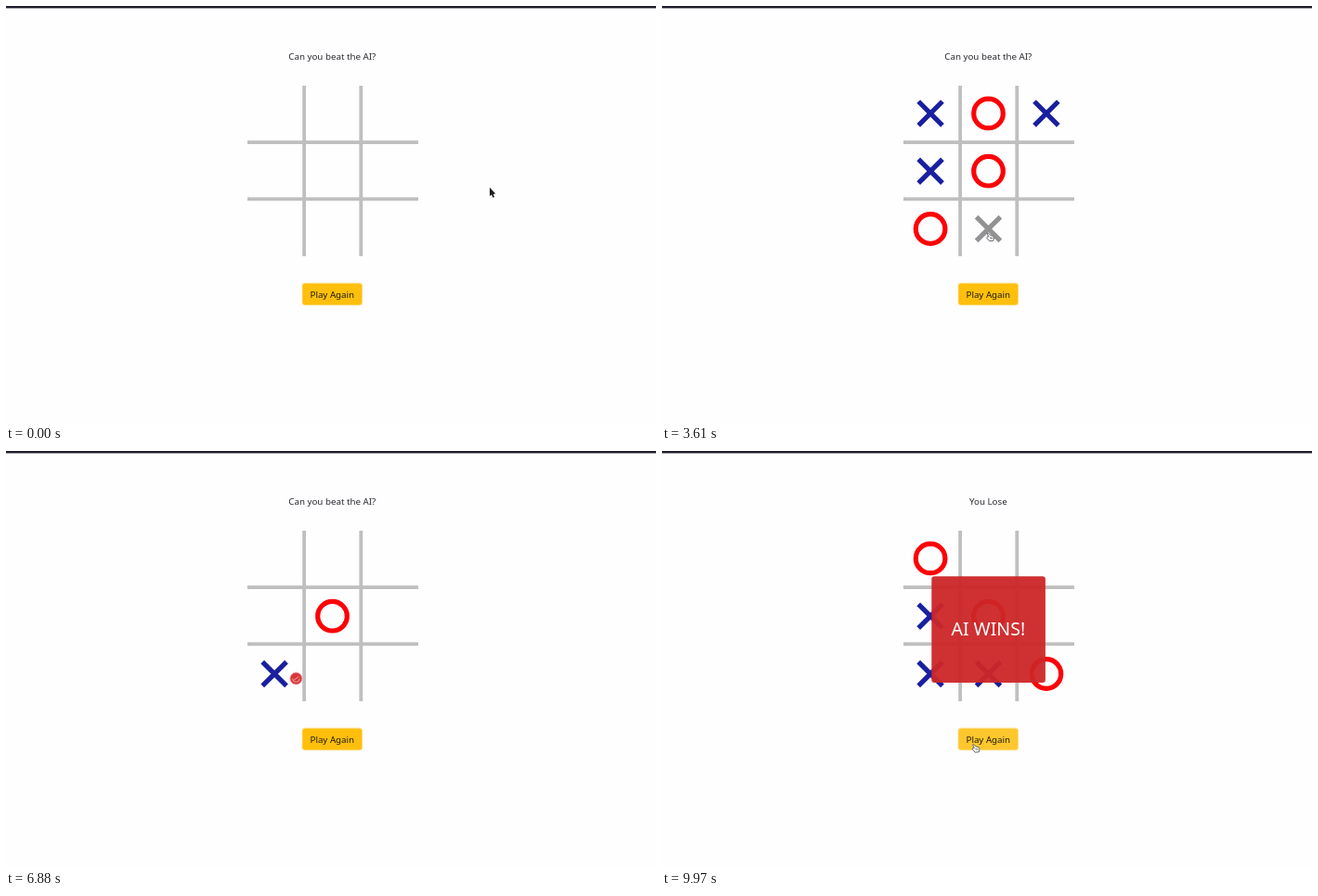
Animation of 700x450 px, one loop 10 s. Source, as an HTML page with a canvas:

```html
<!DOCTYPE html>
<html lang="en">
<head>
<meta charset="utf-8">
<title>Tic-tac-toe</title>
<style>
html, body { margin: 0; width: 100%; height: 100%; overflow: hidden; background: #fefdff; }
canvas { display: block; width: 700px; height: 450px; filter: blur(.35px); }
</style>
</head>
<body>
<canvas id="stage" width="700" height="450"></canvas>
<script>
const ctx = document.getElementById('stage').getContext('2d');
const LOOP = 10000;
const FONT = '"Noto Sans", "Open Sans", sans-serif';
const BOARD = { x: 260, y: 86, w: 184, h: 184 };
const BUTTON = { x: 319.3, y: 299.4, w: 64, h: 23 };
const POPUP = { x: 290.3, y: 135.3, w: 122.6, h: 114.6 };

// Cells count 0-8 row by row; every click gets an immediate reply
const games = [
  { end: 5760, message: "Ah... that's a tie", label: 'TIE!', color: '199,187,60',
    turns: [
      { at: 1000, mine: 0, reply: 4 },
      { at: 2130, mine: 3, reply: 6 },
      { at: 2900, mine: 2, reply: 1 },
      { at: 3640, mine: 7, reply: 5 },
      { at: 4260, mine: 8, aim: [-3, -5] }
    ] },
  { end: LOOP, message: 'You Lose', label: 'AI WINS!', color: '205,38,40',
    turns: [
      { at: 6680, mine: 6, reply: 4 },
      { at: 7160, mine: 7, reply: 8 },
      { at: 8330, mine: 3, reply: 0, aim: [9, 25] }
    ] }
];
for (const game of games) game.over = game.turns.at(-1).at;

const center = cell => ({ x: 289.1 + cell % 3 * 62.4, y: 115.9 + Math.floor(cell / 3) * 62.3 });

// The pointer rests at each clicked cell, longest after the last turn
function restAt({ at, mine, aim = [0, 5] }, game) {
  const c = center(mine), x = c.x + aim[0], y = c.y + aim[1];
  return [{ t: at - 80, x, y }, { t: at + (at === game.over ? 480 : 60), x, y }];
}

const path = [
  { t: 0, x: 521, y: 196 },
  { t: 2580, x: 381, y: 190 },
  { t: 5600, x: 363.5, y: 319 },
  { t: 6080, x: 363.5, y: 319 },
  { t: 9300, x: 336, y: 317 },
  { t: LOOP, x: 336, y: 317 },
  ...games.flatMap(game => game.turns.flatMap(turn => restAt(turn, game)))
].sort((a, b) => a.t - b.t);

function pointerAt(t) {
  const i = path.findIndex(p => p.t > t);
  const a = path[i - 1], b = path[i];
  const u = (t - a.t) / (b.t - a.t), e = u * u * (3 - 2 * u);
  return { x: a.x + (b.x - a.x) * e, y: a.y + (b.y - a.y) * e };
}

function inside(p, r) {
  return p.x >= r.x && p.x <= r.x + r.w && p.y >= r.y && p.y <= r.y + r.h;
}

// Cell under the pointer, or -1 on a grid line or off the board
function cellAt(p) {
  if (!inside(p, BOARD)) return -1;
  const slot = d => Math.abs(d - 61) < 2 || Math.abs(d - 122) < 2 ? -1 : Math.min(2, Math.floor(d / 61));
  const col = slot(p.x - BOARD.x), row = slot(p.y - BOARD.y);
  return col < 0 || row < 0 ? -1 : row * 3 + col;
}

function text(str, y, size, color) {
  ctx.font = `${size}px ${FONT}`;
  ctx.textAlign = 'center';
  ctx.fillStyle = color;
  ctx.fillText(str, 351.3, y);
}

function box(r, color, grow = 0) {
  ctx.beginPath();
  ctx.roundRect(r.x - grow, r.y - grow, r.w + 2 * grow, r.h + 2 * grow, 3);
  ctx.fillStyle = color;
  ctx.fill();
}

function mark(cell, kind, color) {
  const { x, y } = center(cell), d = 12.9;
  ctx.beginPath();
  if (kind === 'X') {
    ctx.moveTo(x - d, y - d); ctx.lineTo(x + d, y + d);
    ctx.moveTo(x + d, y - d); ctx.lineTo(x - d, y + d);
  } else {
    ctx.arc(x, y, 15.8, 0, 7);
  }
  ctx.lineWidth = 5.2;
  ctx.strokeStyle = color;
  ctx.stroke();
}

function drawGrid() {
  ctx.fillStyle = '#bfbfbf';
  for (const d of [61.1, 122.3]) {
    ctx.fillRect(BOARD.x + d - 1.9, BOARD.y, 3.8, BOARD.h);
    ctx.fillRect(BOARD.x, BOARD.y + d - 1.9, BOARD.w, 3.8);
  }
}

function drawButton(hover, focus) {
  box(BUTTON, 'rgba(255,200,50,.4)', focus ? 2 : .8);
  box(BUTTON, hover ? '#fdc72d' : '#ffbf0c', focus ? 1 : 0);
  text('Play Again', 314.6, 9.75, '#211b0a');
}

function drawPopup(game, alpha) {
  ctx.globalAlpha = alpha;
  box(POPUP, `rgba(${game.color},.95)`);
  text(game.label, 199.3, 19.5, '#fff');
  ctx.globalAlpha = 1;
}

const pointers = {
  blocked: { d: 'M-6.5 0a6.5 6.5 0 1 0 13 0a6.5 6.5 0 1 0 -13 0zM-3 2L3 -2M-3.8 0a3.8 3.8 0 1 0 7.6 0', fill: '#d9363a', line: '#eba0a0' },
  hand: { d: 'M-1.5 0L0 -.2L2.2 2L5 2.6L6 4.5L5.4 7.8L1.2 8.2L-1.6 5L-1 3.2L.4 3.4zM1.5 4.7L4.6 5', fill: '#f6f5f7', line: '#6c6c72' },
  arrow: { d: 'M0 0V9L2 7.4L3.4 10.7L4.9 10L3.6 7L6 6.6z', fill: '#1d1d21', line: '#d9d9dc' }
};

function drawPointer(p, kind) {
  const { d, fill, line } = pointers[kind], shape = new Path2D(d);
  ctx.save();
  ctx.translate(p.x, p.y);
  ctx.lineWidth = 1;
  ctx.fillStyle = fill;
  ctx.strokeStyle = line;
  if (kind === 'arrow') ctx.stroke(shape);
  ctx.fill(shape);
  if (kind !== 'arrow') ctx.stroke(shape);
  ctx.restore();
}

function draw(t) {
  const game = games.find(g => t < g.end);
  const done = t >= game.over;
  const fade = Math.min(1, Math.max(0, (t - game.over - 60) / 250));
  const turns = game.turns.filter(turn => t >= turn.at);
  const p = pointerAt(t), cell = cellAt(p);
  const open = cell >= 0 && !turns.some(turn => turn.mine === cell || turn.reply === cell);
  const onButton = inside(p, BUTTON);
  const onPopup = fade > 0 && inside(p, POPUP);
  const focus = game !== games[0] && !turns.length;

  ctx.fillStyle = '#fefdff';
  ctx.fillRect(0, 0, 700, 450);
  ctx.fillStyle = '#1d1c2a';
  ctx.fillRect(0, 0, 700, 2.4);
  text(done ? game.message : 'Can you beat the AI?', 58, 9.75, '#2b2b30');
  drawGrid();

  for (const { mine, reply } of turns) {
    mark(mine, 'X', '#1a1f9f');
    if (reply !== undefined) mark(reply, 'O', '#fc0207');
  }
  if (open && !done) mark(cell, 'X', '#929292');

  drawButton(onButton, focus);
  if (fade) drawPopup(game, fade);

  let kind = 'arrow';
  if (onButton) kind = 'hand';
  else if (!onPopup && inside(p, BOARD)) kind = cell >= 0 && !open ? 'blocked' : 'hand';
  drawPointer(p, kind);
}

const begin = performance.now();
function frame() {
  draw((performance.now() - begin) % LOOP);
  requestAnimationFrame(frame);
}
frame();
</script>
</body>
</html>
```
